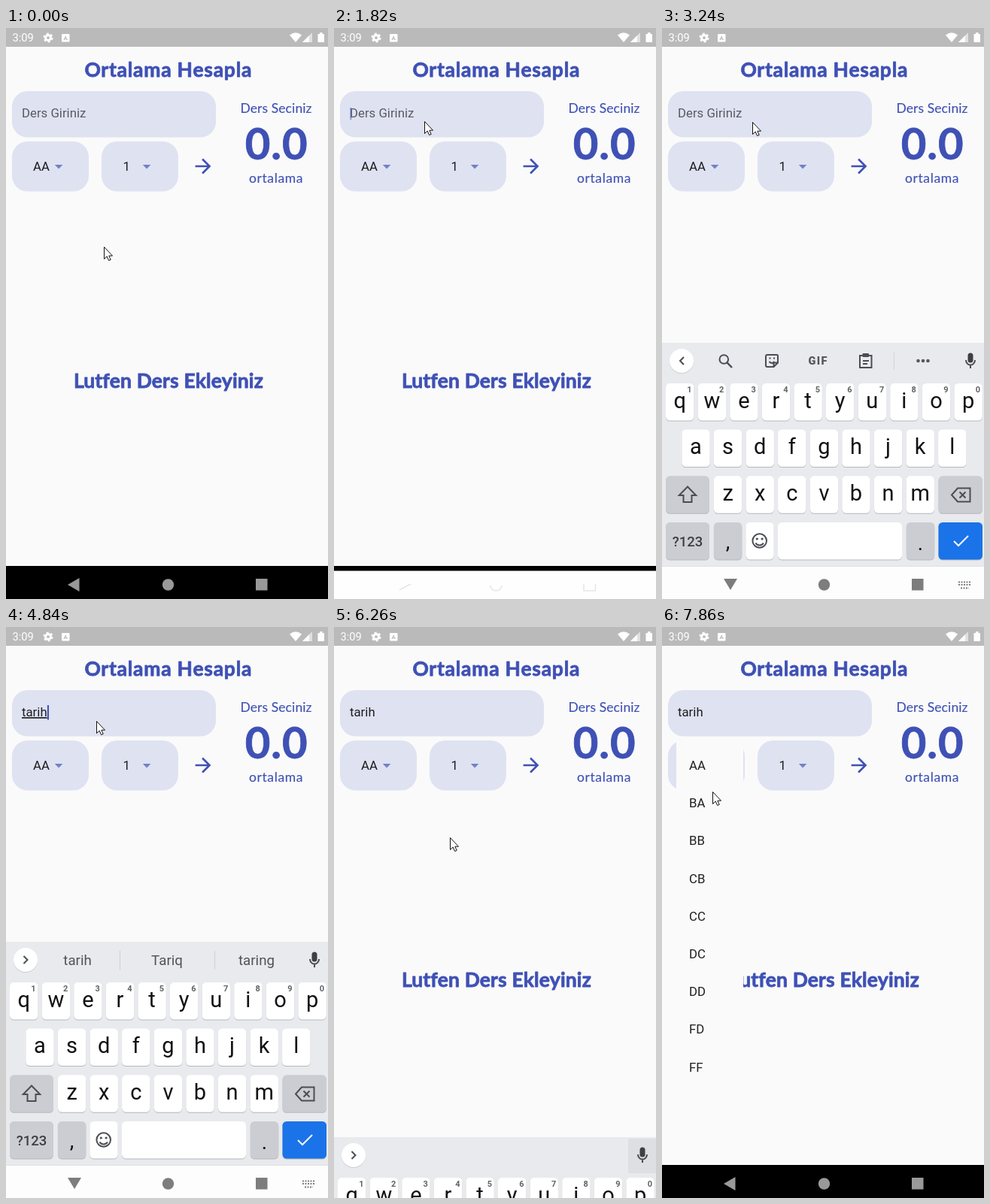
An HTML page that plays this animation: 428 px wide and 760 px high, repeating every 8 s.

```html
<!DOCTYPE html>
<html lang="tr">
<head>
<meta charset="utf-8">
<title>Ortalama Hesapla</title>
<style>
html, body { margin: 0; width: 100%; height: 100%; overflow: hidden; background: #fafafa; }
svg { display: block; width: 428px; height: 760px; font: 16.8px Roboto, sans-serif; }
.brand { font-family: Lato, sans-serif; fill: #3f51b5; stroke: #3f51b5; stroke-width: .15; stroke-linejoin: round; text-anchor: middle; }
.bold { font-weight: 700; font-size: 26.5px; stroke-width: .8; }
.ink { fill: rgba(0,0,0,.87); }
.mid { text-anchor: middle; }
.line { fill: none; stroke: #4a4d52; stroke-width: 2; }
</style>
</head>
<body>
<svg viewBox="0 0 428 760">
  <rect width="428" height="760" fill="#fafafa"/>

  <!-- status bar -->
  <rect width="428" height="25" fill="#bababa"/>
  <g fill="#fff">
    <text x="8.5" y="18" font-size="14.7">3:09</text>
    <circle cx="56" cy="13" r="3.4" fill="none" stroke="#fff" stroke-width="3"/>
    <circle cx="56" cy="13" r="5.5" fill="none" stroke="#fff" stroke-width="2" stroke-dasharray="2.9 2.86"/>
    <rect x="74" y="8" width="10.5" height="10.5" rx="1"/>
    <text x="79.2" y="16.2" font-size="8" font-weight="700" class="mid" fill="#bababa">A</text>
    <path d="M385 19 377 9.5Q385 3 393 9.5Z"/>
    <path d="M394 19H407V6Z" opacity=".55"/>
    <path d="M394 19H403V10Z"/>
    <path d="M414.5 8h2.5v-2h3.5v2h2.5v11h-8.5Z"/>
  </g>

  <!-- page -->
  <text class="brand bold" x="215.8" y="64.5" letter-spacing=".75">Ortalama Hesapla</text>
  <g fill="#dfe2f1">
    <rect x="8" y="84" width="271" height="61.5" rx="20.8"/>
    <rect x="8" y="151" width="102" height="66.5" rx="20.8"/>
    <rect x="127" y="151" width="102" height="66.5" rx="20.8"/>
  </g>
  <text id="field" x="21" y="119"></text>
  <rect id="caret" width="2" fill="#3f51b5"/>
  <text class="ink" x="36" y="190">AA</text>
  <text class="ink" x="155.5" y="190">1</text>
  <path d="M64.8 182h10.6l-5.3 5.4ZM181.8 182h10.6l-5.3 5.4Z" fill="#7480c8"/>
  <path transform="translate(246.4 168.4) scale(1.3)" fill="#3f51b5"
    d="M12 4l-1.41 1.41L16.17 11H4v2h12.17l-5.58 5.59L12 20l8-8z"/>
  <g class="brand" font-size="17.5">
    <text x="359" y="113" letter-spacing=".1">Ders Seciniz</text>
    <text x="359" y="206" letter-spacing=".6">ortalama</text>
  </g>
  <text class="brand bold" x="359.7" y="175" style="font-size:58px" letter-spacing="1">0.0</text>
  <text class="brand bold" id="empty" x="216" y="479" letter-spacing=".15">Lutfen Ders Ekleyiniz</text>

  <!-- navigation bar, keyboard closed -->
  <rect y="716" width="428" height="44"/>
  <g fill="#999">
    <path d="M82 741 97.5 732v18Z"/>
    <circle cx="215.5" cy="741" r="7.7"/>
    <rect x="332" y="733" width="15.5" height="15.5"/>
  </g>
  <g id="rising">
    <rect y="722.5" width="428" height="38" fill="#fefefe"/>
    <path d="M87 748 102 740M208 742a7.5 7 0 0 0 15 0M332 740v9h15.5v-9" fill="none" stroke="#e6e6e6" stroke-width="1.5"/>
  </g>

  <!-- keyboard -->
  <g id="board">
    <rect y="419" width="428" height="345" fill="#e8eaed"/>
    <rect id="patch" x="391" y="421" width="37" height="46" fill="#dedfe3"/>
    <circle cx="26" cy="444" r="16" fill="#c9cbce"/>
    <circle cx="26" cy="443" r="16" fill="#fff"/>
    <path id="chevron" class="line"/>
    <g fill="#3c4043">
      <rect x="406.5" y="432.5" width="7" height="13" rx="3.5"/>
      <path d="M404 442a6 6.5 0 0 0 12 0M410 448.5v4.5" class="line"/>
    </g>
    <g id="tools">
      <g class="line">
        <circle cx="82.3" cy="441" r="5.8"/>
        <path d="M86.5 445.3 93 452" stroke-width="2.5"/>
        <path d="M140 435h12.5q1.5 0 1.5 1.5v9l-5.5 5.5h-8.5q-2 0-2-2v-12q0-2 2-2ZM148.5 451v-5.5h5.5M142.5 444q3.5 4 7 0M142.5 439.5h2M148 439.5h2"/>
        <path d="M263 436h15.5v16H263ZM267 443h8M267 447h6"/>
      </g>
      <rect x="266.5" y="433" width="8.5" height="5" rx="1" fill="#4a4d52"/>
      <text x="194.5" y="448" font-size="14.5" font-weight="900" letter-spacing="1.4" fill="#55585d">GIF</text>
      <path d="M308.5 432v23" stroke="#d0d3d7"/>
      <g fill="#55585d"><circle cx="340.5" cy="443" r="2.3"/><circle cx="347" cy="443" r="2.3"/><circle cx="353.5" cy="443" r="2.3"/></g>
    </g>
    <g id="words" class="mid" font-size="18.7" fill="#505358">
      <text x="95" y="450"></text><text x="214" y="450"></text><text x="333" y="450"></text>
      <path d="M151.5 431v25M277.5 431v25" stroke="#cdd0d4"/>
    </g>
    <g id="keys"></g>
    <g class="line">
      <path d="M34 610.5 22.8 622H28.5v9h11v-9h5.7Z"/>
      <path d="M393 612.5H409.5V630.5H393L385 621.5ZM395.5 617.5l8 8M403.5 617.5l-8 8"/>
      <circle cx="129.7" cy="682.5" r="9.3"/>
      <path d="M124.5 685.5a5.7 5 0 0 0 10.4 0"/>
      <path d="M388 683l6 6 13-13" style="stroke:#fff"/>
    </g>
    <g fill="#4a4d52"><circle cx="126.3" cy="680" r="1.6"/><circle cx="133.1" cy="680" r="1.6"/></g>
  </g>

  <!-- navigation bar, keyboard open -->
  <g id="lightNav" fill="#7d7d7d">
    <rect y="716.5" width="428" height="44" fill="#fdfdfd"/>
    <path d="M0 716.5H428" stroke="#dfe1e4"/>
    <path d="M82 733h18l-9 15Z"/>
    <circle cx="215.5" cy="741" r="7.7"/>
    <rect x="332" y="733" width="15.5" height="15.5"/>
    <path d="M394 737.5h17M394 741h17M397 745.5h11" stroke="#7d7d7d" stroke-width="2" stroke-dasharray="2 1.5"/>
  </g>

  <!-- grade menu -->
  <g id="menu" class="ink">
    <rect id="sheet" x="19" y="151" width="89" fill="#fafafa"/>
  </g>

  <path id="mouse" fill="#fff" stroke="#111" d="M.5.5V16.5L4.2 13 6.6 18.5 9.2 17.4 6.8 12.2H11.5Z"/>
</svg>
<script>
const LOOP = 8000;
const $ = id => document.getElementById(id);

function add(parent, tag, attrs, text = '') {
  const el = document.createElementNS('http://www.w3.org/2000/svg', tag);
  for (const k in attrs) el.setAttribute(k, attrs[k]);
  el.textContent = text;
  return parent.appendChild(el);
}

const PITCH = 42.6, GREY = '#cbcdd2';
function key(x, y, w, label = '', fill = '#fff', size = 29, dy = 32.5, weight = 400) {
  const box = { x, width: w, height: 49.5, rx: 5.5 };
  add($('keys'), 'rect', { ...box, y: y + 1, fill: '#b6b8bc' });
  add($('keys'), 'rect', { ...box, y, fill });
  add($('keys'), 'text', { x: x + w / 2, y: y + dy, class: 'mid', 'font-size': size, 'font-weight': weight,
    fill: weight > 400 ? '#3c4043' : '#111' }, label);
}
[['qwertyuiop', 5, 473], ['asdfghjkl', 26.3, 534.5], ['zxcvbnm', 68.9, 596.3]].forEach(([row, x, y], r) =>
  [...row].forEach((c, i) => {
    key(x + i * PITCH, y, 37.4, c);
    if (!r) add($('keys'), 'text', { x: 36.5 + i * PITCH, y: 485, class: 'mid', 'font-size': 11,
      'font-weight': 700, fill: '#5f6368' }, (i + 1) % 10);
  }));
key(5, 596.3, 58, '', GREY);
key(367.5, 596.3, 58.5, '', GREY);
key(5, 658, 58, '?123', GREY, 18.5, 32, 500);
key(68.9, 658, 37.4, ',', GREY, 28, 35);
key(111.3, 658, 37.4);
key(154, 658, 165);
key(324.8, 658, 37.4, '.', GREY, 28, 37);
key(367.5, 658, 58.5, '', '#1a73e8');

const grades = ['AA', 'BA', 'BB', 'CB', 'CC', 'DC', 'DD', 'FD', 'FF'].map((g, i) =>
  add($('menu'), 'text', { x: 36, y: 190 + i * 50.2 }, g));

// Each row: start time, then values held until the next row.
const mouse = [[0, 130, 291], [200, 128, 240], [400, 124, 180], [600, 121, 137], [800, 120, 124], [2620, 120, 125],
  [5460, 160, 188], [5660, 270, 365], [5860, 366, 535], [6060, 406, 673], [6260, 154, 280], [6460, 121, 211],
  [6660, 88, 194], [6860, 56, 181], [7060, 38, 176], [7660, 52, 197], [7860, 67, 219]];
const typed = [[0, ''], [3840, 't', 'the', 'to'], [4040, 'ta', 'take', 'talk'], [4240, 'tar', 'target', 'tart'],
  [4440, 'tari', 'tariff', 'Tariq'], [4840, 'tarih', 'Tariq', 'taring']];
const caret = [[0, 0], [1820, .5], [2020, 1], [2220, 0], [2620, 1], [3240, 0], [3840, 1], [6060, 0]];
const slide = [[0, 400], [2020, 45], [2220, 0], [6260, 260], [6460, 400]];
const menu = [[0, 0, 0], [7660, .75, 250], [7860, 1, 470]];

const at = (rows, t) => rows.findLast(r => r[0] <= t).slice(1);
const show = (id, on) => $(id).style.display = on ? '' : 'none';

function draw(t) {
  const [mx, my] = at(mouse, t);
  $('mouse').setAttribute('transform', `translate(${mx} ${my})`);

  const words = at(typed, t), text = words[0], field = $('field');
  field.textContent = text || 'Ders Giriniz';
  field.setAttribute('fill', text ? 'rgba(0,0,0,.87)' : 'rgba(0,0,0,.6)');
  field.setAttribute('text-decoration', text && t < 6060 ? 'underline' : 'none');
  const c = $('caret');
  c.setAttribute('x', text ? 21.3 + field.getComputedTextLength() : 21.3);
  c.setAttribute('y', text ? 104 : 106);
  c.setAttribute('height', text ? 19.5 : 16);
  c.setAttribute('opacity', at(caret, t)[0]);

  const [dy] = at(slide, t), closing = t >= 6260;
  show('board', dy < 400);
  $('board').setAttribute('transform', `translate(0 ${dy})`);
  show('lightNav', dy < 100);
  show('rising', t >= 1820 && t < 2020);
  show('empty', t < 2020 || closing);
  show('tools', !text);
  show('words', text && !closing);
  show('patch', closing);
  $('chevron').setAttribute('d', text ? 'M23.5 438l5 5-5 5' : 'M29 438l-5 5 5 5');
  document.querySelectorAll('#words text').forEach((el, i) => el.textContent = words[i] || '');

  const [alpha, height] = at(menu, t);
  show('menu', alpha);
  $('menu').setAttribute('opacity', alpha);
  $('sheet').setAttribute('height', height);
  grades.forEach((el, i) => el.setAttribute('opacity', i * 50.2 + 50 <= height ? 1 : 0));
}

function tick(now) {
  draw(now % LOOP);
  requestAnimationFrame(tick);
}
draw(0);
requestAnimationFrame(tick);
</script>
</body>
</html>
```
